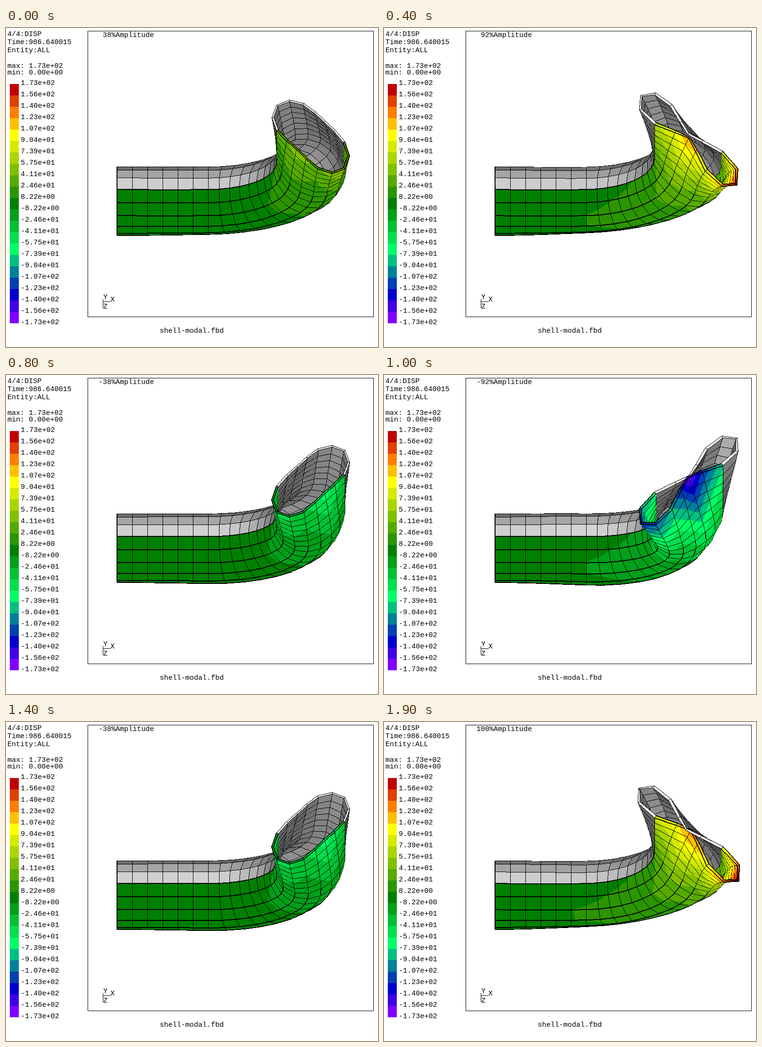
Recreate the animation shown at these times as an HTML page with a canvas. Size 784 px wide and 672 px high, loop 2 s.

```html
<!DOCTYPE html>
<html lang="en">
<head>
<meta charset="utf-8">
<title>Shell mode shape</title>
<style>
  html, body { margin: 0; width: 100%; height: 100%; overflow: hidden; background: #fff; }
  canvas { display: block; }
</style>
</head>
<body>
<canvas id="stage" width="784" height="672"></canvas>
<script>
const W = 784, H = 672;
const ctx = document.getElementById('stage').getContext('2d');
const image = ctx.createImageData(W, H);
const pixels = new Uint32Array(image.data.buffer);
const depth = new Float32Array(W * H);

const { sin, cos, abs, min, max, floor, round, hypot, PI } = Math;
const BLACK = 0xff000000, WHITE = 0xffffffff, RIM = 0xfff2f2f2;
const MAX_DISP = 172.53, BANDS = 21, BAR = 24;

// Colour stops of the legend: band index and RGB
const stops = [
  [0, 192, 0, 0], [2, 255, 128, 0], [4, 255, 255, 0], [10, 0, 128, 0],
  [14, 0, 255, 102], [18, 0, 0, 204], [20, 128, 0, 255]
];

function bandColor(i) {
  const k = max(1, stops.findIndex(s => s[0] >= i));
  const a = stops[k - 1], b = stops[k];
  const t = (i - a[0]) / (b[0] - a[0]);
  return [1, 2, 3].map(c => round(a[c] + (b[c] - a[c]) * t));
}

const pack = ([r, g, b]) => (0xff000000 | b << 16 | g << 8 | r) >>> 0;
const palette = Array.from({ length: BANDS }, (_, i) => bandColor(i));
const packed = palette.map(pack);

function contour(value) {
  const i = floor((1 - value / MAX_DISP) * BANDS / 2);
  return packed[max(0, min(BANDS - 1, i))];
}

// Pipe elbow: straight run, quarter bend, straight run
const RINGS = 22, AROUND = 16, STEP = 32, BEND = 216;
const BEND_FROM = 6, BEND_TO = 16;
const RADIUS = 70.3, HALF_WALL = 1.7;
const TILT = 20 * PI / 180;
const ARC = BEND * PI / 2;
const LENGTH = 2 * BEND_FROM * STEP + ARC;

function node(i, j, offset, amp) {
  const before = min(i, BEND_FROM) * STEP;
  const after = max(0, i - BEND_TO) * STEP;
  const turn = max(0, min(1, (i - BEND_FROM) / (BEND_TO - BEND_FROM)));
  const beta = turn * PI / 2, sb = sin(beta), cb = cos(beta);
  const q = (before + turn * ARC + after) / LENGTH;
  const phi = j * 2 * PI / AROUND, s = sin(phi), c = cos(phi);
  const s2 = sin(2 * phi), c2 = cos(2 * phi);

  // Ovalisation, twist, sway and warping; the wall turns with the section
  const oval = 75 * q ** 3.2 - 150 * (q * (1 - q)) ** 2;
  const r = RADIUS + offset - amp * oval * s2;
  const roll = 1.5 * oval * c2 * offset / RADIUS;
  const tangent = amp * (-oval / 2 * c2 + 2.8 * q + roll);
  const sway = amp * (45 * q ** 2 - 52.5 * q ** 4);
  const warp = amp * q ** 3 * ((14.5 + 0.33 * offset) * s2 + 8 * s);

  const out = r * c - tangent * s;
  const v = r * s + tangent * c + sway;
  const x = 234.4 + before + BEND * sb + out * sb + warp * cb;
  const w = BEND * (1 - cb) + after - out * cb + warp * sb;

  const near = q / 0.25;
  const lobe = max(0, 0.6 * s2 - 0.7 * s);
  const size = (80 + 14 * s * s + 4 * c) * q ** 3
    + (1 - cos(4 * phi)) / 2 * (66 + 25 * c) * q ** 3.8
    + 6.5 * lobe * near * Math.exp(1 - near);

  return {
    x,
    y: 364.5 - v * cos(TILT) - w * sin(TILT),
    z: w * cos(TILT) - v * sin(TILT),
    disp: amp * size
  };
}

// Flat grey from how far the face turns towards the viewer
function grey(a, b, c, d) {
  const ux = c.x - a.x, uy = c.y - a.y, uz = c.z - a.z;
  const vx = d.x - b.x, vy = d.y - b.y, vz = d.z - b.z;
  const nx = uy * vz - uz * vy, ny = uz * vx - ux * vz, nz = ux * vy - uy * vx;
  const g = round(255 * (0.28 + 0.62 * abs(nz) / (hypot(nx, ny, nz) || 1)));
  return pack([g, g, g]);
}

function triangle(a, b, c, flat) {
  const area = (b.x - a.x) * (c.y - a.y) - (b.y - a.y) * (c.x - a.x);
  if (abs(area) < 1e-6) return;
  const x0 = floor(min(a.x, b.x, c.x)), x1 = max(a.x, b.x, c.x);
  const y0 = floor(min(a.y, b.y, c.y)), y1 = max(a.y, b.y, c.y);
  for (let y = y0; y <= y1; y++) {
    for (let x = x0; x <= x1; x++) {
      const px = x + 0.5, py = y + 0.5;
      const kb = ((px - a.x) * (c.y - a.y) - (py - a.y) * (c.x - a.x)) / area;
      const kc = ((b.x - a.x) * (py - a.y) - (b.y - a.y) * (px - a.x)) / area;
      const ka = 1 - kb - kc;
      if (ka < 0 || kb < 0 || kc < 0) continue;
      const z = ka * a.z + kb * b.z + kc * c.z, p = y * W + x;
      if (z <= depth[p]) continue;
      depth[p] = z;
      pixels[p] = flat || contour(ka * a.disp + kb * b.disp + kc * c.disp);
    }
  }
}

function quad(a, b, c, d, flat) {
  triangle(a, b, c, flat);
  triangle(a, c, d, flat);
}

function plot(x, y, z) {
  const p = y * W + x;
  if (z + 1.4 >= depth[p]) pixels[p] = BLACK;
}

function line(a, b, thick) {
  const dx = b.x - a.x, dy = b.y - a.y;
  const n = max(1, Math.ceil(max(abs(dx), abs(dy))));
  const flat = abs(dx) > abs(dy);
  for (let k = 0; k <= n; k++) {
    const t = k / n;
    const x = floor(a.x + dx * t), y = floor(a.y + dy * t), z = a.z + (b.z - a.z) * t;
    plot(x, y, z);
    if (thick) plot(x - (flat ? 0 : 1), y + (flat ? 1 : 0), z);
  }
}

function drawMesh(amp) {
  pixels.fill(WHITE);
  depth.fill(-1e9);
  const layers = [HALF_WALL, -HALF_WALL].map(offset =>
    Array.from({ length: RINGS + 1 }, (_, i) =>
      Array.from({ length: AROUND + 1 }, (_, j) => node(i, j, offset, amp))));
  const colored = j => j >= AROUND / 2;

  for (const g of layers) {
    for (let i = 0; i < RINGS; i++) {
      for (let j = 0; j < AROUND; j++) {
        const face = [g[i][j], g[i + 1][j], g[i + 1][j + 1], g[i][j + 1]];
        quad(...face, colored(j) ? 0 : grey(...face));
      }
    }
  }
  const [rimOut, rimIn] = layers.map(g => g[RINGS]);
  for (let j = 0; j < AROUND; j++) {
    quad(rimOut[j], rimOut[j + 1], rimIn[j + 1], rimIn[j], colored(j) ? 0 : RIM);
  }

  for (const g of layers) {
    for (let i = 0; i <= RINGS; i++) {
      for (let j = 0; j < AROUND; j++) {
        line(g[i][j], g[i][j + 1], i === 0 || (i === RINGS && colored(j)));
        if (i < RINGS) line(g[i][j], g[i + 1][j], colored(j) && i < BEND_TO);
      }
    }
  }
  for (let j = 0; j < AROUND; j++) line(rimOut[j], rimIn[j]);
  ctx.putImageData(image, 0, 0);
}

function legendLabel(i) {
  const value = MAX_DISP * (1 - 2 * i / BANDS);
  return value.toExponential(2).replace(/(\d)$/, '0$1');
}

function drawLabels(amp) {
  ctx.font = '15px "Liberation Mono", monospace';
  ctx.fillStyle = '#000';
  const text = (s, x, y) => ctx.fillText(s, x, y);
  text('4/4:DISP', 3, 17);
  text('Time:986.640015', 3, 34);
  text('Entity:ALL', 3, 51);
  text('max: 1.73e+02', 3, 84);
  text('min: 0.00e+00', 3, 98);
  for (let i = 0; i <= BANDS; i++) text(legendLabel(i), 31, 120 + BAR * i);
  text(`${round(amp * 100)}`.padStart(4) + '%Amplitude', 186, 19);
  text('shell-modal.fbd', 324, 642);
  text('Y', 205, 571);
  text('X', 220, 576);
  text('Z', 205, 591);

  palette.forEach((c, i) => {
    ctx.fillStyle = `rgb(${c})`;
    ctx.fillRect(8, 118 + BAR * i, 19, BAR);
  });
  ctx.fillStyle = '#000';
  ctx.fillRect(204, 571, 1, 19);
  ctx.fillRect(204, 576, 16, 1);
  ctx.strokeStyle = '#000';
  ctx.lineWidth = 1;
  ctx.strokeRect(172.5, 6.5, 602, 602);
}

let shown = -1;

function tick() {
  const step = floor(performance.now() % 2000 / 100);
  if (step !== shown) {
    shown = step;
    const amp = sin((step + 1) * PI / 8);
    drawMesh(amp);
    drawLabels(amp);
  }
  requestAnimationFrame(tick);
}
tick();
</script>
</body>
</html>
```
